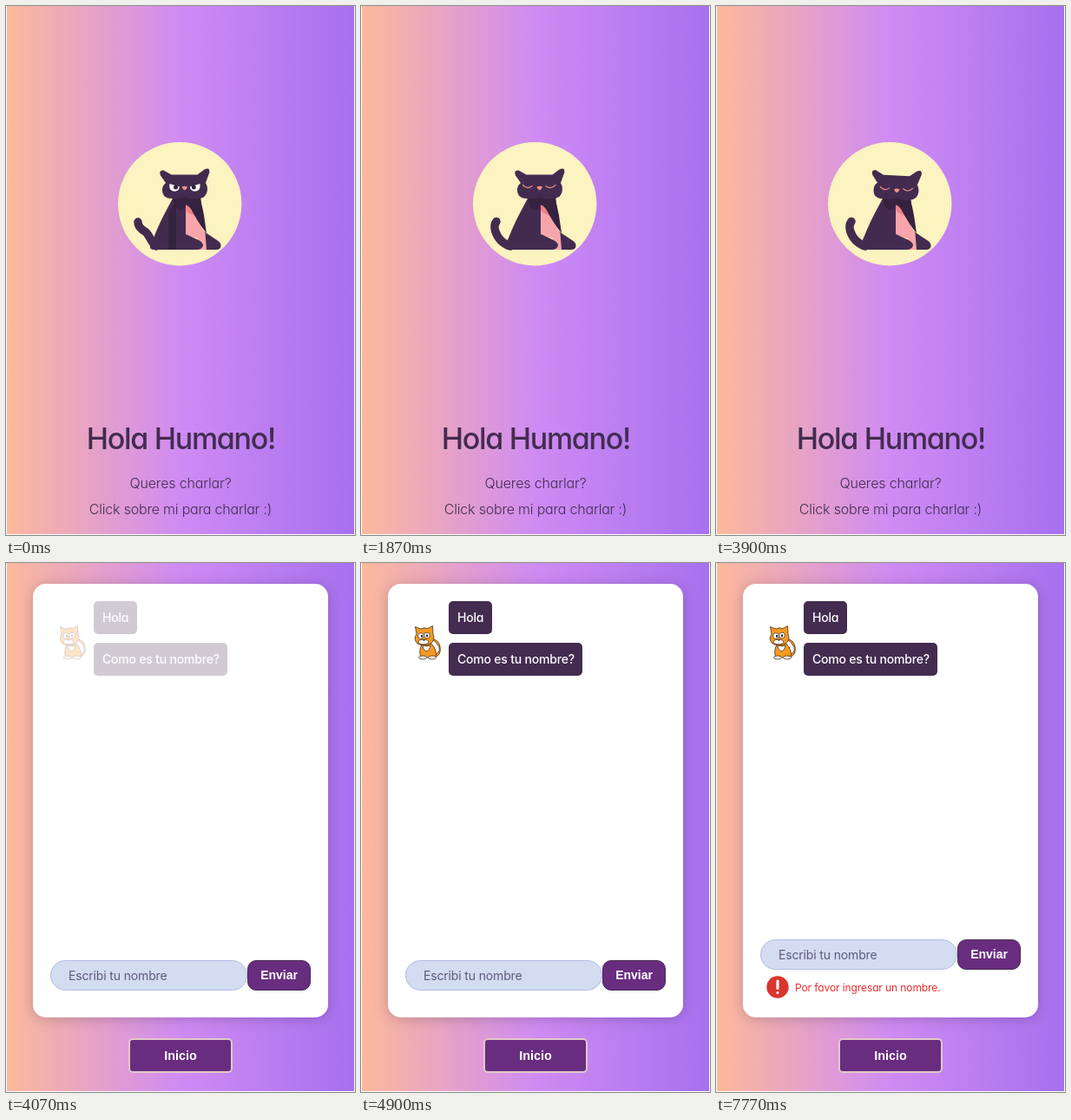
An HTML page that plays this animation: 402x610 px, repeating every 8000 ms.

```html
<!DOCTYPE html>
<html lang="es">
<head>
<meta charset="utf-8">
<title>Hola Humano</title>
<style>
  html, body { margin: 0; width: 100%; height: 100%; overflow: hidden; background: #fff; }
  svg { display: block; width: 100vw; height: 100vh; }
  text { font-family: Inter, Lato, sans-serif; font-feature-settings: "cv11"; font-optical-sizing: none; }
  .btn { font: bold 14px "Liberation Sans", Arial, sans-serif; fill: #fff; text-anchor: middle; }
  .mid { text-anchor: middle; fill: #432c50; }
  .say { font-size: 14px; font-weight: 500; letter-spacing: -.2px; fill: #fff; }
</style>
</head>
<body>
<svg viewBox="0 0 402 610" preserveAspectRatio="xMidYMid meet">
  <defs>
    <linearGradient id="bg">
      <stop offset="0" stop-color="#fdb99b"/>
      <stop offset=".5" stop-color="#cf8bf3"/>
      <stop offset="1" stop-color="#a770ef"/>
    </linearGradient>
    <filter id="shadow" x="-15%" y="-15%" width="130%" height="130%">
      <feDropShadow dx="0" dy="2" stdDeviation="8" flood-color="#000" flood-opacity=".2"/>
    </filter>
  </defs>
  <rect x="1" width="400" height="609" fill="url(#bg)"/>

  <g id="home">
    <circle cx="200.2" cy="228.2" r="71.2" fill="#fbf3c0"/>
    <path id="tail" fill="none" stroke="#432b50" stroke-width="9.5" stroke-linecap="round"/>
    <!-- far leg, chest, body -->
    <path fill="#35223f" d="M194 219H222Q227 232 229 248L231 262L208 232Z"/>
    <path fill="#432b50" d="M228 260L231 262L243 270Q248 273 247.500 277Q247 281 242 281H229Z"/>
    <path fill="#f7a5ab" d="M206 229Q212 231 215 238L229.500 262L231 281H221V268L206 264Z"/>
    <path fill="#ee8288" d="M206.500 229Q212 231 215 238L217 242Q211 240 206.500 235Z"/>
    <path fill="#432b50" d="M193 220C185 235 178 247 171 265L166 276Q165 281 170 281H221Q227 280 227 275Q226 272 222 270L207 263V220Z"/>
    <path id="band" fill="#35223f" d="M187 238L196 226V281H187Z"/>
    <path fill="#35223f" d="M191 219H224L226 236Q222 240 216 236Q211 230 207 229Q205 237 199 235Q194 232 193 226Z"/>
    <g id="head">
      <path fill="#432b50" d="M178 195.500Q175.500 189 181.500 189.500L190.500 194.500H220.500L228.500 188.500Q235 185.500 234.300 192L230 204Q232 207 232 212Q231 222 221 222H212L206 220.500L200 222H191Q180 222 180 212Q180 207 184 204Z"/>
      <g id="face">
        <path fill="#f58f8b" d="M202.500 208.500Q205.800 207 209 208.500Q208 211.500 205.800 212.500Q203.500 211.500 202.500 208.500Z"/>
        <g id="open">
          <path fill="#fff" d="M188.300 205L200 208.600A5.900 5.900 0 0 1 188.300 208.500Z"/>
          <path fill="#fff" d="M223.500 205L211.800 208.600A5.900 5.900 0 0 0 223.500 208.500Z"/>
          <circle cx="195.500" cy="209" r="2.500" fill="#35223f"/>
          <circle cx="216.300" cy="209" r="2.500" fill="#35223f"/>
        </g>
        <path id="shut" fill="none" stroke="#e58a80" stroke-width="1.200" stroke-linecap="round" d="M186.500 206.500Q191.500 212 197 207.500M213 207.500Q218.500 212 224 206.500"/>
      </g>
    </g>
    <text class="mid" x="201.400" y="510.500" font-size="34" font-weight="500" letter-spacing="-1.300">Hola Humano!</text>
    <text class="mid" x="201" y="556" font-size="16" font-weight="300" letter-spacing="-.150">Queres charlar?</text>
    <text class="mid" x="201" y="586" font-size="16" font-weight="300" letter-spacing="-.200">Click sobre mi para charlar :)</text>
  </g>

  <g id="chat">
    <rect x="31" y="24" width="340" height="500" rx="15" fill="#fff" filter="url(#shadow)"/>
    <g id="talk">
      <rect x="101" y="44" width="50" height="38" rx="5" fill="#432c50"/>
      <text class="say" x="111" y="68">Hola</text>
      <rect x="101" y="92" width="154" height="38" rx="5" fill="#432c50"/>
      <text class="say" x="111" y="116">Como es tu nombre?</text>
      <g stroke="#4a3020" stroke-width=".8" stroke-linejoin="round" fill="#f59a1f">
        <path d="M82 106Q92 105 90 97Q87 91 82 88Q89 88 91 96Q93 107 84 109Z"/>
        <path d="M70 94Q66 102 69 109H86Q88 100 81 93Z"/>
        <path d="M64 82L62.500 73.500L69 76Q73 74 77 75.500L82.500 72.500L83 82Q86 89 80 93Q72 97 65 93Q60 88 64 82Z"/>
        <path fill="#fff" d="M71 95Q76 97 80 95Q79 101 75 102Q71 100 71 95Z"/>
        <ellipse fill="#fff" cx="71" cy="109" rx="4.500" ry="2"/>
        <ellipse fill="#fff" cx="82" cy="109" rx="4.500" ry="2"/>
        <ellipse fill="#fff" cx="72" cy="91" rx="6" ry="2.800"/>
        <circle fill="#fff" cx="69" cy="84" r="3.400"/>
        <circle fill="#fff" cx="76" cy="83.500" r="3.400"/>
      </g>
      <path fill="#222" d="M69 83h2v2.500h-2zM75 82.500h2v2.500h-2zM71 88.500h3l-1.500 1.500z"/>
    </g>
    <g id="form">
      <rect x="51.500" y="458.500" width="226" height="34" rx="17" fill="#d3dcf1" stroke="#b0bee4"/>
      <text x="72" y="481" font-size="14" letter-spacing="-.150" fill="#5e5a7c">Escribi tu nombre</text>
      <rect id="caret" x="72" y="467" width="1" height="18" fill="#222"/>
      <rect id="send" x="278.500" y="458.500" width="72" height="34" rx="9.500" stroke="#432c50"/>
      <rect id="ring" x="279" y="459" width="71" height="33" rx="3" fill="#432c50" stroke="#e59a12" stroke-width="2"/>
      <text class="btn" x="314.600" y="480">Enviar</text>
    </g>
    <g id="error">
      <circle cx="71" cy="489" r="12.700" fill="#d8362f"/>
      <path d="M71 482V490.500M71 495.500V495.600" stroke="#fff" stroke-width="3.200" stroke-linecap="round"/>
      <text x="91" y="494" font-size="12" letter-spacing="-.100" fill="#ee2d2d">Por favor ingresar un nombre.</text>
    </g>
    <rect x="142" y="549" width="118" height="38" rx="4" fill="#692d80" stroke="#e2c9c6" stroke-width="2"/>
    <text class="btn" x="201" y="573" style="font-size:14.400px">Inicio</text>
  </g>
</svg>
<script>
const LOOP = 8000;
const $ = id => document.getElementById(id);
const set = (id, name, value) => $(id).setAttribute(name, value);
const show = (id, on) => set(id, 'visibility', on ? 'inherit' : 'hidden');
const part = (t, a, b) => Math.min(1, Math.max(0, (t - a) / (b - a)));
const smooth = p => p * p * (3 - 2 * p);

// Tail poses: start point and two cubic segments.
const rest = [173,277, 166,272, 166,264, 160,260, 155,257, 152,254, 152,249];
const up   = [172,277, 163,274, 157,267, 154.500,259, 153.500,255, 154,251, 156,248.500];
const out  = [173,277, 170,268, 168,262, 162,260, 157,259, 152,258, 149,253];
const curl = [174,276, 176,268, 175,259, 169,254, 165,251, 161,252, 158.500,254];
const wag = [[30, rest], [230, out], [830, up], [1870, up], [2200, out],
  [2640, curl], [2730, curl], [3500, up], [LOOP, up]];

function tailPath(t) {
  let i = 0;
  while (i < wag.length - 2 && t >= wag[i + 1][0]) i++;
  const [t0, a] = wag[i], [t1, b] = wag[i + 1];
  const p = smooth(part(t, t0, t1));
  const q = a.map((v, n) => v + (b[n] - v) * p);
  return `M${q.slice(0, 2)}C${q.slice(2)}`;
}

function drawHome(t) {
  set('tail', 'd', tailPath(t));
  const turn = smooth(part(t, 1900, 2560));
  set('head', 'transform', `translate(${1.8 * turn} ${turn}) rotate(${3 * turn} 206 206)`);
  set('face', 'transform', `translate(${turn} ${1.8 * turn})`);
  const lid = smooth(part(t, 60, 320));
  set('open', 'transform', `translate(0 ${209 * lid}) scale(1 ${1 - lid})`);
  show('open', lid < 1);
  show('shut', lid > .85);
  show('band', t < 100);
}

function drawChat(t) {
  set('talk', 'opacity', 1 - (1 - part(t, 3960, 4930)) ** 2.3);
  const failed = t >= 5900;
  const hover = t >= 5700 && t < 7230;
  set('form', 'transform', `translate(0 ${failed ? -24 : 0})`);
  set('send', 'fill', hover ? '#432c50' : '#692d80');
  show('send', !(hover && t >= 5800));
  show('ring', hover && t >= 5800);
  show('caret', t >= 7230 && t < 7770);
  show('error', failed);
}

function draw(t) {
  const chatting = t >= 4000;
  show('home', !chatting);
  show('chat', chatting);
  drawHome(t);
  drawChat(t);
}

function tick() {
  draw(performance.now() % LOOP);
  requestAnimationFrame(tick);
}
tick();
</script>
</body>
</html>
```
